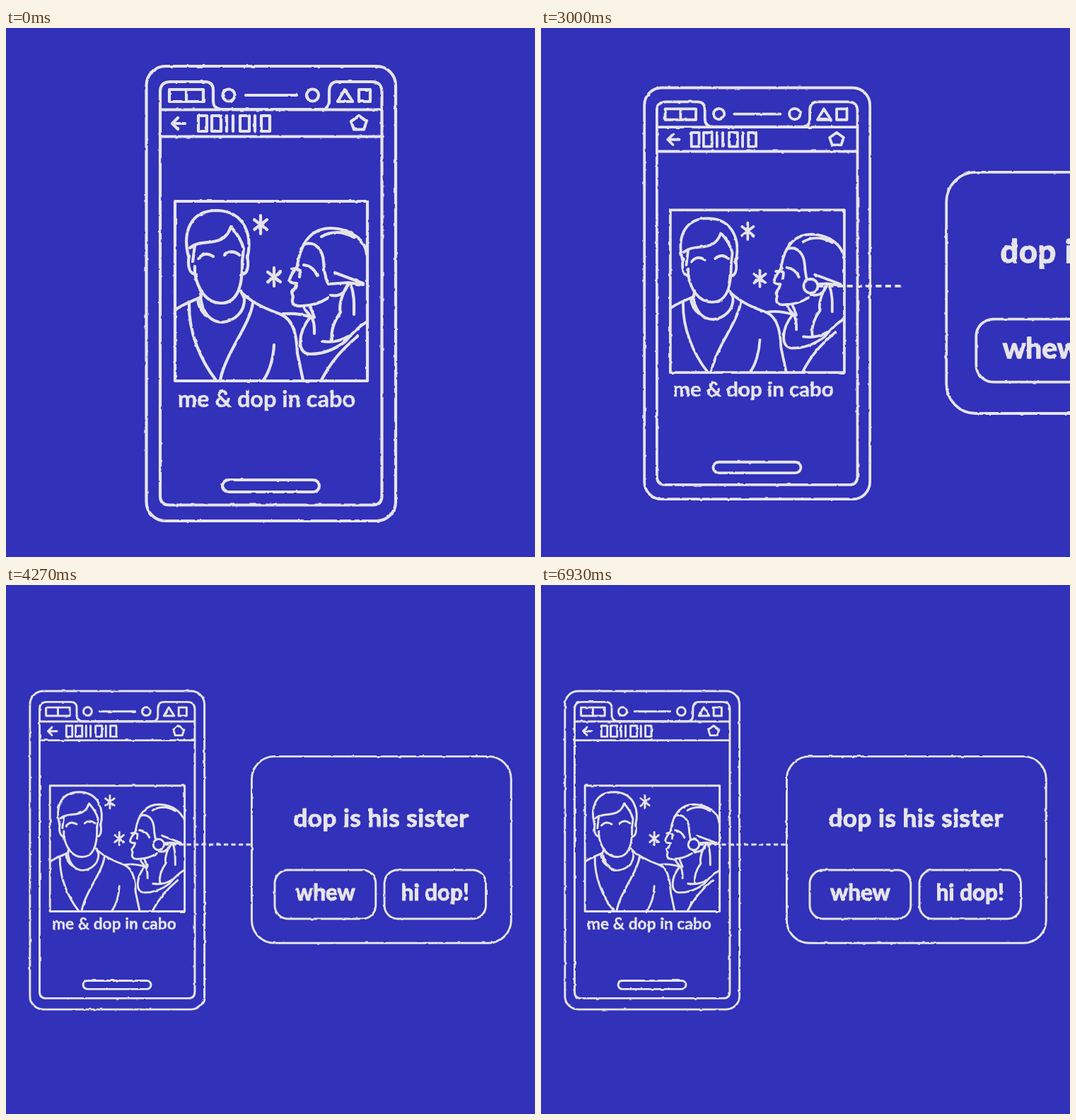
Animation, 748 px wide and 748 px high, one loop 7.07 s. Source, as an HTML page:

```html
<!DOCTYPE html>
<html lang="en">
<head>
<meta charset="utf-8">
<title>Phone and card</title>
<style>
  html, body { margin: 0; width: 100%; height: 100%; overflow: hidden; background: #3131b9; }
  svg { display: block; width: 100vw; height: 100vh; }
  .ink { fill: none; stroke: #e6e4e8; stroke-width: 4.2; stroke-linecap: round; stroke-linejoin: round; }
  text { fill: #e6e4e8; stroke-width: .5; font: 700 32.5px Lato, "Open Sans", sans-serif; }
  .title, .button { text-anchor: middle; stroke-width: 1.6; }
  .title { font-size: 50px; letter-spacing: .8px; }
  .button { font-size: 45px; }
</style>
</head>
<body>
<svg viewBox="0 0 748 748">
  <defs>
    <filter id="rough" filterUnits="userSpaceOnUse" x="0" y="0" width="748" height="748" color-interpolation-filters="sRGB">
      <feTurbulence id="noise" type="fractalNoise" baseFrequency=".13" numOctaves="1" seed="1" result="n"/>
      <feDisplacementMap in="SourceGraphic" in2="n" scale="2.6" xChannelSelector="R" yChannelSelector="G"/>
      <feGaussianBlur stdDeviation=".35"/>
    </filter>
    <path id="star" d="M0-13V13M-9-7L9 7M9-7L-9 7"/>
  </defs>

  <g filter="url(#rough)">
    <g id="camera" class="ink">
      <!-- phone -->
      <rect x="198.5" y="54" width="352.5" height="643" rx="27"/>
      <path d="M218 90q0-14 15-14H281q12 0 12 12V102q0 13 13 13H446q11 0 11-12V90q0-14 12-14H517q14 0 14.5 14V661q0 13.500-13 13.500H231q-13 0-13-13Z"/>
      <path d="M218 115.500H531M218 153.500H531M339 95H411"/>
      <path d="M231 87H279V104H231ZM255 87V104M479 87L490 104H469ZM499 87H515V104H499Z"/>
      <circle cx="315" cy="95" r="8.5"/>
      <circle cx="433.5" cy="95" r="8.5"/>
      <path d="M253 135H235M243 127L235 135L243 143M499 124L510 132L506 143.500H492L488 132Z"/>
      <path d="M272 124h12v22h-12ZM291 124h13v22h-13ZM312 124v22M321 124v22M331 124h13v22h-13ZM352 124v22M361 124h12v22h-12Z"/>
      <rect x="306" y="639" width="137" height="17" rx="8.5"/>

      <!-- picture -->
      <rect x="239" y="245" width="272" height="254"/>
      <use href="#star" x="360" y="278"/>
      <use href="#star" x="379" y="352"/>

      <!-- man -->
      <path d="M258 323C250 292 258 258 298 258C338 259 349 294 341 326"/>
      <path d="M260 311C276 296 308 313 318 281C326 290 333 300 336 312L334 330"/>
      <path d="M267 307L264 331M259 322C256 337 260 348 268 348M267 337V347C271 369 283 389 304 389C325 389 335 370 334 328M341 322C344 338 341 347 335 348"/>
      <path d="M272 326Q281 315 293 323M309 321Q319 312 330 321"/>
      <path d="M277 372L275 381C278 404 290 416 306 416C324 414 338 401 337 382L332 372M271 383C272 394 277 402 284 407"/>
      <path d="M239 399C250 390 265 386 276 380M334 375C350 390 370 398 389 405C409 414 411 440 412 460L420 498"/>
      <path d="M259 390C258 430 275 470 297 498M349 389C345 420 310 460 303 498M379 448C378 468 372 487 364 498"/>

      <!-- woman -->
      <path d="M412 335C416 311 427 283 460 283C490 284 509 302 510 320M446 295C463 285 480 289 492 296"/>
      <path d="M421 306C439 300 448 316 449 330C450 346 452 356 456 362L484 360L505 363M465 346L505 361"/>
      <path d="M413 335C409 342 401 350 401 357Q402 361 411 361L409 367L404 374L406 380C402 391 409 394 418 393C432 393 444 389 455 382"/>
      <path d="M421 335Q435 337 440 350M404 341Q411 339 416 343L415 352"/>
      <path d="M459 378C472 380 480 374 483 363C472 382 471 396 473 402C463 416 459 428 461 441M487 362C493 376 492 390 492 405"/>
      <path d="M421 393C425 408 437 402 436 432M430 394L436 409M389 405C405 402 420 405 432 409"/>
      <path d="M430 409C413 430 410 461 430 461C450 461 467 453 480 443C490 431 500 421 511 415M447 443C460 445 474 442 484 436M497 436C478 452 460 470 446 498"/>

      <text x="243" y="536">me &amp; dop in cabo</text>

      <!-- callout -->
      <path id="lead" stroke-dasharray="9 6" stroke-linecap="butt"/>
      <circle id="ring" cx="458.5" cy="364" r="11" pathLength="1"/>
      <g id="card">
        <rect x="646.5" y="186" width="524" height="377" rx="46"/>
        <rect x="693" y="415.5" width="204" height="98.5" rx="27"/>
        <rect x="914.5" y="415.5" width="205" height="98.5" rx="27"/>
        <text class="title" x="907.5" y="328">dop is his sister</text>
        <text class="button" x="795" y="477">whew</text>
        <text class="button" x="1017" y="477">hi dop!</text>
      </g>
    </g>
  </g>
</svg>

<script>
const LOOP = 7070, FPS = 15, STEPS_PER_BOIL = 4;
const $ = id => document.getElementById(id);
const noise = $("noise"), camera = $("camera"), lead = $("lead"), ring = $("ring"), card = $("card");

const progress = (t, from, to) => Math.min(1, Math.max(0, (t - from) / (to - from)));
const smooth = u => u * u * (3 - 2 * u);

// Slow-in, long slow-out: cubic-bezier(.5, 0, .12, 1)
function glide(x) {
  let lo = 0, hi = 1;
  for (let i = 0; i < 24; i++) {
    const u = (lo + hi) / 2, v = 1 - u;
    if (1.5 * u * v * v + .36 * u * u * v + u * u * u < x) lo = u; else hi = u;
  }
  return smooth((lo + hi) / 2);
}

function draw(step) {
  const t = step * 1000 / FPS;
  noise.setAttribute("seed", 1 + Math.floor(step / STEPS_PER_BOIL));

  const p = glide(progress(t, 2768, 3530));
  const scale = 1 - .3 * p;
  camera.setAttribute("transform",
    `translate(${374 * (1 - scale) - 217.3 * p} ${374 * (1 - scale)}) scale(${scale})`);

  const drawn = smooth(progress(t, 2000, 2470));
  ring.setAttribute("visibility", drawn > 0 ? "visible" : "hidden");
  ring.setAttribute("stroke-dasharray", drawn < 1 ? `${drawn} 2` : "none");
  ring.setAttribute("fill", drawn < 1 ? "none" : "#3131b9");

  const reach = smooth(progress(t, 2460, 3250));
  lead.setAttribute("d", reach > 0 ? `M470 364H${470 + 176 * reach}` : "");

  const away = 1 - progress(t, 2800, 3200);
  card.setAttribute("transform", `translate(${192 * away ** 3} 0)`);
  card.setAttribute("visibility", t > 2768 ? "visible" : "hidden");
}

const start = performance.now();
let shown = -1;
function tick() {
  const ms = (performance.now() - start) % LOOP;
  const step = Math.floor((ms + 4) * FPS / 1000);
  if (step !== shown) draw(shown = step);
  requestAnimationFrame(tick);
}
tick();
</script>
</body>
</html>
```
